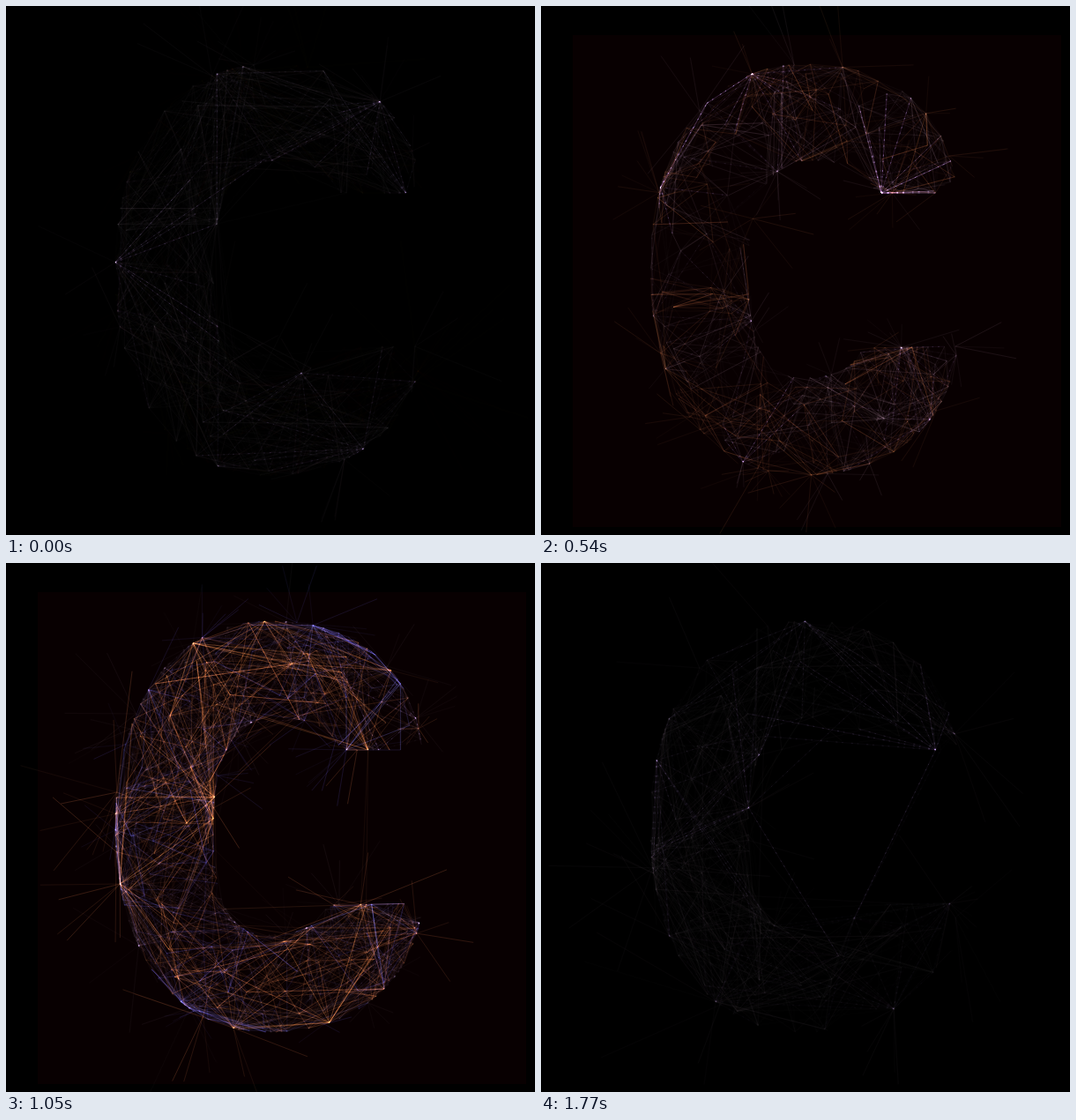
Animation, 600 px wide and 600 px high, one loop 1800 ms. Source, as an HTML page with a canvas:

```html
<!DOCTYPE html>
<html lang="en">
<head>
<meta charset="utf-8">
<title>Letter C in threads of light</title>
<style>
  html, body { margin: 0; width: 100%; height: 100%; overflow: hidden; background: #000; }
  canvas { display: block; width: 600px; height: 600px; }
</style>
</head>
<body>
<canvas id="stage" width="600" height="600"></canvas>
<script>
const ctx = document.getElementById('stage').getContext('2d');
const STEP = 30, COUNT = 60;

const outline = 'M472 212C462 120 400 66 300 66C190 66 124 160 124 298' +
  'C124 440 190 532 298 532C400 532 466 470 472 386L365 388C350 420 320 422 290 422' +
  'C245 415 235 370 235 298C235 220 258 175 305 175C350 175 370 190 380 212Z';
const letter = new Path2D(outline);
const inside = (x, y) => ctx.isPointInPath(letter, x, y);

const svgPath = document.createElementNS('http://www.w3.org/2000/svg', 'path');
svgPath.setAttribute('d', outline);
const pathLength = svgPath.getTotalLength();
const edge = Array.from({ length: 300 }, (_, i) => {
  const p = svgPath.getPointAtLength(pathLength * i / 300);
  return [p.x, p.y];
});

function random(seed) {
  let s = seed * 7919 + 17;
  return () => {
    s = s + 0x6D2B79F5 | 0;
    let v = Math.imul(s ^ s >>> 15, s | 1);
    v ^= v + Math.imul(v ^ v >>> 7, v | 61);
    return ((v ^ v >>> 14) >>> 0) / 4294967296;
  };
}

// Each web is random; its threads grow and shrink twice per loop.
function buildWeb(k) {
  const r = random(k + 1);
  const pick = list => list[Math.floor(r() * list.length)];
  const repeat = (length, make) => Array.from({ length }, (_, i) => make(i));
  const spread = Math.cos(Math.PI * k / 30) ** 2;
  const reach = 75 + 125 * spread;

  const node = () => {
    if (r() < 0.4) return pick(edge);
    let x, y;
    do { x = 124 + 348 * r(); y = 66 + 466 * r(); } while (!inside(x, y));
    return [x, y];
  };
  const linked = (a, b, range) => {
    const at = t => inside(a[0] + (b[0] - a[0]) * t, a[1] + (b[1] - a[1]) * t);
    const d = Math.hypot(a[0] - b[0], a[1] - b[1]);
    return d > 12 && d < range && (r() < 0.12 * spread || at(0.2) && at(0.5) && at(0.8));
  };

  // Hubs are spread evenly along the outline, so every part of the letter has some.
  const hubs = repeat(12, i => edge[Math.floor((i + r()) * edge.length / 12)]);
  const nodes = hubs.concat(repeat(150, node));
  const mesh = [], spokes = [], rays = [];

  for (let tries = 0; tries < 9000 && mesh.length < 650; tries++) {
    const a = pick(nodes), b = pick(nodes);
    if (linked(a, b, reach)) mesh.push([a, b, 0.15 + 0.85 * r() ** 3]);
  }
  for (const hub of hubs) {
    const strength = 0.2 + 0.8 * r() ** 2;
    const ends = nodes.filter(b => r() < 0.4 && linked(hub, b, reach * 1.1)).slice(0, 12);
    for (const b of ends) spokes.push([hub, b, strength * (0.2 + 0.8 * r())]);
  }
  for (let i = 0; i < 16; i++) {
    const a = i < 6 ? pick(hubs) : pick(edge);
    const size = 40 + (40 + 90 * spread) * r();
    for (let n = 3 + 6 * r(); n > 0; n--) {
      const turn = 2 * Math.PI * r(), length = size * (0.4 + 0.6 * r());
      const b = [a[0] + length * Math.cos(turn), a[1] + length * Math.sin(turn)];
      rays.push([a, b, 0.2 + 0.6 * r()]);
    }
  }
  return { mesh, spokes, rays };
}

const webs = Array.from({ length: COUNT }, (_, k) => buildWeb(k));

// Rises from step a to b, falls from step c to d.
const clamp = v => Math.max(0, Math.min(1, v));
const pulse = (i, a, b, c, d) => clamp(Math.min((i - a) / (b - a), (d - i) / (d - c)));

const layers = [
  { shift: -24, mesh: '70,66,165', spoke: '112,116,225',
    power: i => 0.75 * pulse(i, 20, 27, 30, 56) },
  { shift: 0, mesh: '160,88,50', spoke: '225,135,68',
    power: i => 0.9 * pulse(i, -1, 36, 36, 42) },
  { shift: 2, mesh: '95,76,90', spoke: '180,115,220', sparkle: true,
    power: i => 0.42 - 0.2 * Math.cos(4 * Math.PI * i / COUNT) }
];

function strokeLines(lines, color, alpha, width) {
  ctx.strokeStyle = `rgb(${color})`;
  ctx.lineWidth = width;
  for (const [a, b, strength] of lines) {
    ctx.globalAlpha = alpha * strength;
    ctx.beginPath();
    ctx.moveTo(...a);
    ctx.lineTo(...b);
    ctx.stroke();
  }
}

function drawLayer(layer, i) {
  const power = layer.power(i);
  if (power <= 0) return;
  const { mesh, spokes, rays } = webs[(i + layer.shift + COUNT) % COUNT];
  strokeLines(mesh, layer.mesh, power * 0.6, 0.7);
  strokeLines(rays, layer.mesh, power * 0.6, 0.8);
  strokeLines(spokes, layer.spoke, power * (layer.sparkle ? 0.4 : 0.75), 0.9);
  if (layer.sparkle) {
    ctx.setLineDash([1.5, 5, 2, 9]);
    strokeLines(spokes, '205,175,255', power * 0.9, 0.9);
    ctx.setLineDash([]);
  }
}

function draw(i) {
  ctx.globalCompositeOperation = 'source-over';
  ctx.globalAlpha = 1;
  ctx.fillStyle = '#000';
  ctx.fillRect(0, 0, 600, 600);
  if (i > 5 && i < 39) {
    ctx.fillStyle = '#080001';
    ctx.fillRect(36, 33, 554, 558);
  }
  ctx.globalCompositeOperation = 'lighter';
  for (const layer of layers) drawLayer(layer, i);
}

const start = performance.now();
let shown = -1;
function tick() {
  const i = Math.floor((performance.now() - start) / STEP) % COUNT;
  if (i !== shown) draw(shown = i);
  requestAnimationFrame(tick);
}
tick();
</script>
</body>
</html>
```
